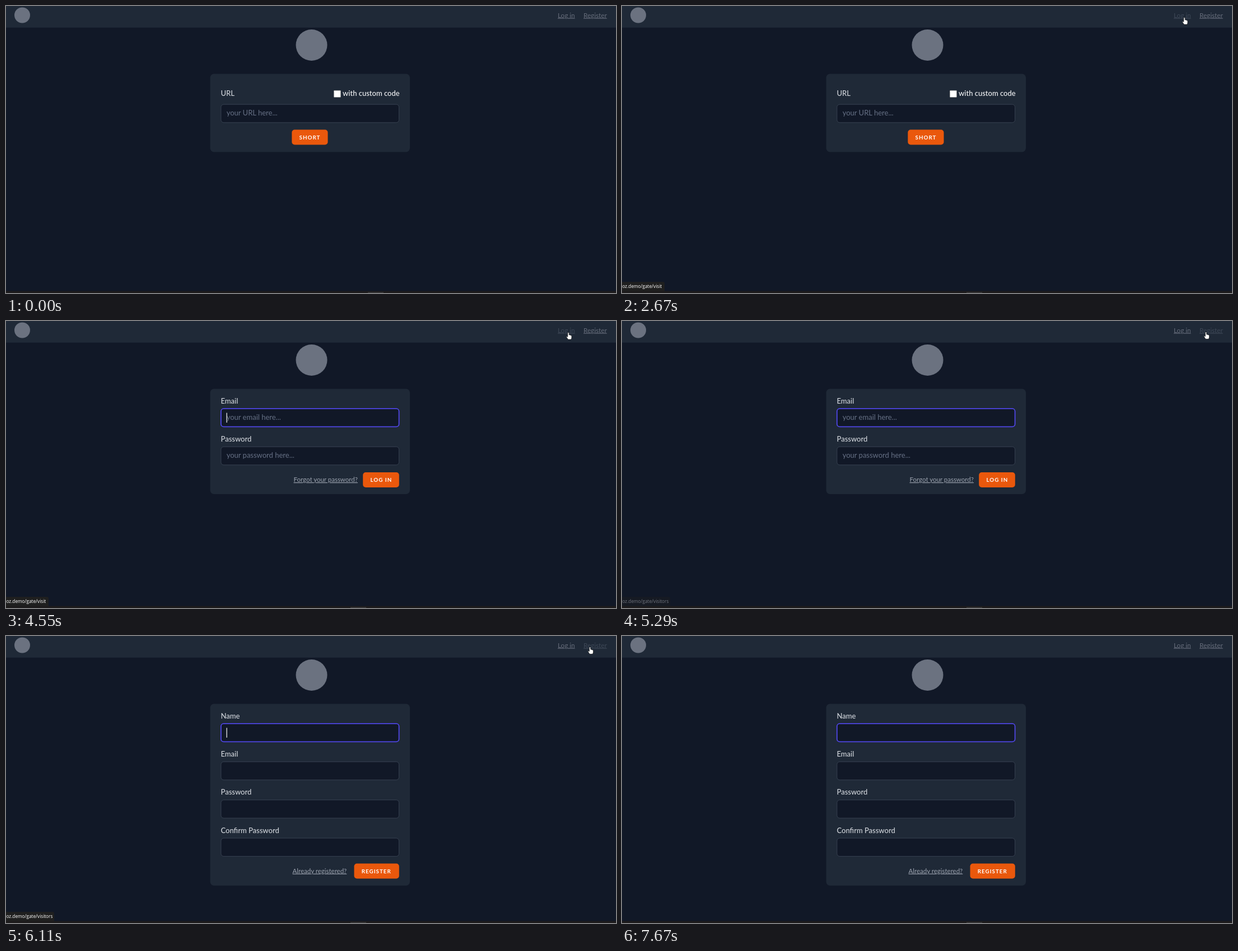
An HTML page that plays this animation: 1089 px wide and 514 px high, repeating every 8000 ms.

```html
<!DOCTYPE html>
<html lang="en">
<head>
<meta charset="utf-8">
<title>Link shortener</title>
<style>
  html, body { margin: 0; width: 100%; height: 100%; overflow: hidden; background: #111827; }
  svg { display: block; width: 100%; height: 100%; }
  text { font: 13px Lato, "Open Sans", sans-serif; fill: #d1d5db; white-space: pre; }
  .label { font-weight: 500; }
  .bright { fill: #f3f4f6; }
  .hint { fill: #667085; }
  .link { font-size: 11.5px; fill: #9ca3af; text-decoration: underline; }
  .nav { font-size: 11.7px; text-decoration: underline; }
  .action { font-size: 9.8px; font-weight: 700; letter-spacing: 1px; fill: #fff; }
  .status { font: 8.2px "Open Sans", "Noto Sans", sans-serif; fill: #fff; }
</style>
</head>
<body>
<svg viewBox="0 0 1089 514">
  <rect width="1089" height="514" fill="#111827"/>
  <rect width="1089" height="38.7" fill="#1f2937"/>
  <circle cx="29" cy="16.5" r="14" fill="#6b7280"/>
  <circle cx="545.5" cy="70" r="28" fill="#6b7280"/>
  <text id="loginLink" class="nav" x="985" y="20.5">Log in</text>
  <text id="registerLink" class="nav" x="1031" y="20.5">Register</text>

  <g id="home"></g>
  <g id="login"></g>
  <g id="register"></g>
  <rect id="caret" x="393.5" y="164.5" width="1.2" height="17.5" fill="#fff"/>

  <g id="status">
    <path id="statusBox" fill="#1f1f1f"/>
    <text id="statusText" class="status" x="0.5" y="504.8"></text>
  </g>
  <rect y="510.5" width="1089" height="3.5" fill="#1d1b1c"/>
  <rect id="taskbar" y="512.5" width="28" height="1.5" fill="#3b3a3b"/>

  <circle id="clickMark" r="9" fill="#ff0" fill-opacity=".47"/>
  <g id="cursor" stroke="#111" stroke-width=".7" fill="#fff" stroke-linejoin="round">
    <path id="arrow" d="M0 0V9.6L2.2 7.6L3.8 11.2L5.4 10.5L3.8 7H6.8Z"/>
    <path id="hand" d="M-1.2 1Q0 -.6 1.2 1V4.6Q2.3 4 3 5Q4 4.6 4.6 5.6Q5.7 5.2 5.9 6.6V9.6Q5.8 11 4.8 12.8H-.6Q-2 10.6-3.6 8.2Q-3.4 6.6-1.2 8Z"/>
  </g>
</svg>
<script>
const LOOP = 8000;
const HOVER_FADE = 150;
const BLINK = 465;
const $ = id => document.getElementById(id);

// Form parts
const label = (y, text, x = 383.5, cls = 'label') => `<text class="${cls}" x="${x}" y="${y}">${text}</text>`;
const card = height => `<rect x="364.5" y="121.5" width="356.5" height="${height}" rx="7" fill="#1f2937"/>`;
const field = (y, hint = '', focused = false) =>
  `<rect x="383.8" y="${y}" width="317.8" height="32.6" rx="5" fill="#111827"
     stroke="${focused ? '#4f46e5' : '#374151'}" stroke-width="${focused ? 1.8 : 1}"/>` +
  label(y + 20, hint, 393.7, 'hint');
const button = (x, y, width, text) =>
  `<rect x="${x}" y="${y}" width="${width}" height="27" rx="5" fill="#ea580c"/>` +
  label(y + 17, text, x + 13.3, 'action');

$('home').innerHTML = card(140) +
  label(160.5, 'URL') +
  '<rect x="585.3" y="151.3" width="12.2" height="12.2" rx="1" fill="#fff" stroke="#767676" stroke-width=".6"/>' +
  label(160.5, 'with custom code', 601, 'label bright') +
  field(176.2, 'your URL here...') +
  button(510.3, 221.5, 64.2, 'SHORT');

$('login').innerHTML = card(188.5) +
  label(147.6, 'Email') + field(156.8, 'your email here...', true) +
  label(216, 'Password') + field(225.2, 'your password here...') +
  label(288, 'Forgot your password?', 513.5, 'link') +
  button(637.2, 271, 64.6, 'LOG IN');

$('register').innerHTML = card(325.5) +
  ['Name', 'Email', 'Password', 'Confirm Password'].map((name, i) =>
    label(147.6 + i * 68.4, name) + field(156.8 + i * 68.4, '', i === 0)).join('') +
  label(424.6, 'Already registered?', 511.5, 'link') +
  button(621.5, 407.5, 80.3, 'REGISTER');

// Pointer positions, each held until the next: time, shape, x, y
const pointer = [
  [0, ''],
  [250, 'arrow', 1041, 482], [320, 'arrow', 1020, 385], [380, 'arrow', 985, 270], [450, 'arrow', 962.5, 188],
  [730, 'arrow', 985, 105], [800, 'arrow', 1009, 32],
  [1070, 'arrow', 1006, 28], [1140, 'arrow', 1004, 25],
  [2070, 'hand', 1004, 22], [2140, 'hand', 1004, 20.3],
  [4820, 'hand', 1011, 20], [4890, 'arrow', 1020, 19], [4960, 'arrow', 1029, 19],
  [5020, 'hand', 1036, 19.5], [5090, 'hand', 1042.5, 19.5],
  [5960, 'arrow', 1041.5, 19.5], [6110, 'hand', 1042.5, 19.5],
  [6580, 'hand', 1040, 22], [6640, 'arrow', 1025, 90], [6710, 'arrow', 995, 180], [6780, 'arrow', 967, 239],
  [6980, 'arrow', 880, 225], [7050, 'arrow', 700, 180], [7120, 'arrow', 490, 130],
  [7190, 'arrow', 270, 85], [7260, 'arrow', 80, 45], [7330, '']
];
const clicks = [[1680, 1870, 1003, 25], [2480, 2670, 1003, 20], [5560, 5760, 1041.5, 19]];

const within = (t, from, to) => t >= from && t < to;
const ramp = (t, from, to) => Math.min(1, Math.max(0, (t - from) / (to - from)));
const pulse = (t, from, to, fadeIn, fadeOut) => ramp(t, from, from + fadeIn) - ramp(t, to, to + fadeOut);
const show = (id, visible) => $(id).setAttribute('visibility', visible ? 'visible' : 'hidden');

function tintLink(id, hover) {
  const mix = (a, b) => Math.round(a + (b - a) * hover);
  $(id).style.fill = `rgb(${mix(102, 62)},${mix(109, 72)},${mix(123, 87)})`;
}

function drawStatus(t) {
  const registering = t >= 5200;
  const dip = t < 3620 ? 1 : 1 - 0.6 * ramp(t, 3620, 3720) + 0.6 * ramp(t, 3740, 3830);
  const opacity = registering ? pulse(t, 5220, 6980, 180, 200) : pulse(t, 2170, 5070, 200, 130) * dip;
  $('statusText').textContent = registering ? 'oz.demo/gate/visitors' : 'oz.demo/gate/visit';
  $('statusBox').setAttribute('d', `M0 494H${registering ? 83 : 73}q3 0 3 3V511H0Z`);
  $('status').setAttribute('opacity', opacity);
}

function drawPointer(t) {
  const [, shape, x = 0, y = 0] = pointer.findLast(key => key[0] <= t);
  show('arrow', shape === 'arrow');
  show('hand', shape === 'hand');
  $('cursor').setAttribute('transform', `translate(${x} ${y})`);

  const click = clicks.find(([from, to]) => within(t, from, to));
  show('clickMark', click);
  if (click) $('clickMark').setAttribute('transform', `translate(${click[2]} ${click[3]})`);
}

function draw(t) {
  show('home', t < 3620);
  show('login', within(t, 3620, 6110));
  show('register', t >= 6110);

  const focusTime = t - (t < 6110 ? 3620 : 6110);
  show('caret', t >= 3620 && Math.floor(focusTime / BLINK) % 2 === 0);

  const loginHover = t < 3620
    ? ramp(t, 2070, 2070 + HOVER_FADE)
    : pulse(t, 3660, 4890, HOVER_FADE, HOVER_FADE);
  tintLink('loginLink', loginHover);
  tintLink('registerLink', pulse(t, 5020, 6600, HOVER_FADE, HOVER_FADE));

  $('taskbar').setAttribute('x', t < 1680 ? 646 : 615);
  drawStatus(t);
  drawPointer(t);
}

const start = performance.now();
function tick() {
  draw((performance.now() - start) % LOOP);
  requestAnimationFrame(tick);
}
tick();
</script>
</body>
</html>
```
